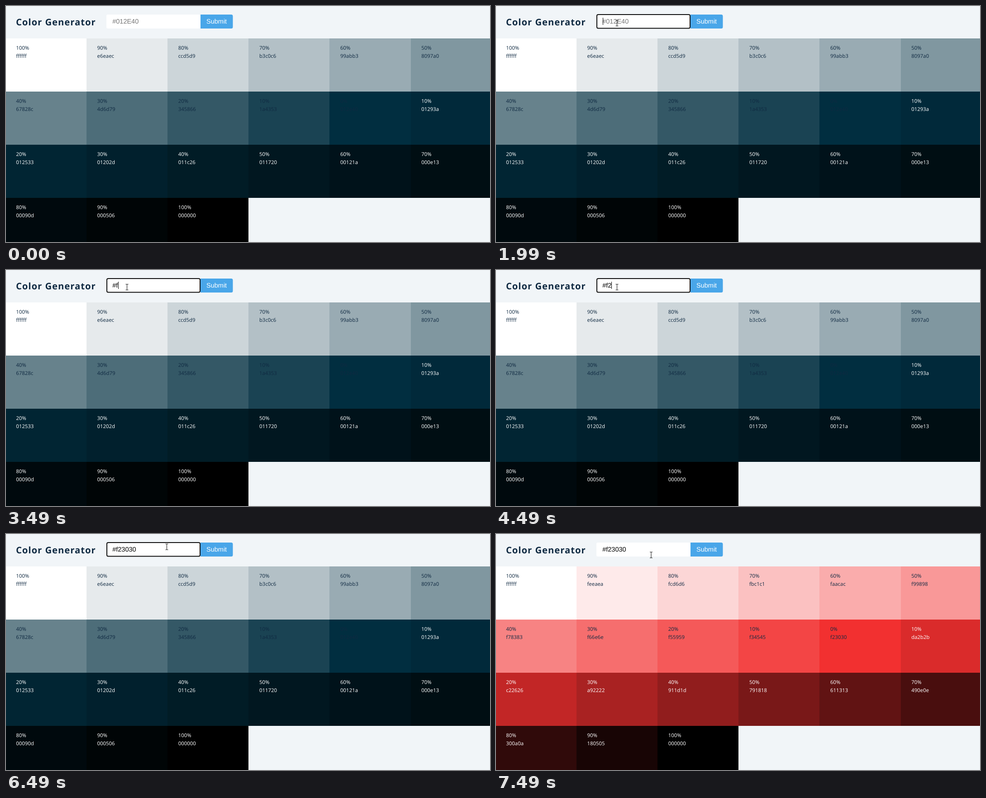
Write an HTML page that moves like this. It is 1070 by 524 pixels and loops after 7990 ms.

```html
<!DOCTYPE html>
<html lang="en">
<head>
<meta charset="utf-8">
<title>Color Generator</title>
<style>
  html, body { margin: 0; width: 100%; height: 100%; overflow: hidden; background: #f1f5f8; }
  svg { display: block; width: 1070px; height: 524px; text-rendering: geometricPrecision; }
  .title { font: 700 20.2px "Open Sans", "Noto Sans", sans-serif; letter-spacing: 1px; fill: #102a42; }
  .field { font: 14.5px "Liberation Sans", Arial, sans-serif; }
  .cell { font: 11.4px "Open Sans", "Noto Sans", sans-serif; fill: #102a42; }
  .cell.light { font-weight: 500; fill: #fff; }
</style>
</head>
<body>
<svg viewBox="0 0 1070 524">
  <rect width="1070" height="524" fill="#f1f5f8"/>
  <g id="palette"></g>

  <text class="title" x="22" y="42.5">Color Generator</text>
  <path d="M430 19h68a3.5 3.5 0 0 1 3.5 3.5v24a3.5 3.5 0 0 1-3.5 3.5h-68z" fill="#49a6e9"/>
  <text class="field" x="443" y="39" fill="#fff">Submit</text>
  <path d="M225 19h205v31h-205a3 3 0 0 1-3-3v-25a3 3 0 0 1 3-3z" fill="#fff"/>
  <rect id="focus" x="223" y="19" width="206" height="30.5" rx="3" fill="#fff" stroke="#101010" stroke-width="2"/>
  <text id="value" class="field" x="235.2" y="39"></text>
  <rect id="caret" y="26" width="1" height="16"/>

  <g id="arrow">
    <path d="M.5 .5v14.2l3.3-3.1 2.2 5 2.2-1-2.1-4.8h4.5z" fill="#fff" stroke="#000" stroke-width=".9"/>
  </g>
  <g id="beam" fill="none">
    <path d="M-3-6.5h2l1 .8 1-.8h2M0-5.7v11.4M-3 6.5h2l1-.8 1 .8h2" stroke="#222" stroke-width="1.1"/>
  </g>
  <g id="hand">
    <circle r="11" fill="#ffeb14" fill-opacity=".55"/>
    <path transform="translate(-1 1)" d="M.3 9.8V1.6C.3-.1 2.6-.1 2.6 1.6V6.2C3.2 5.3 4.8 5.5 4.9 6.6C5.6 5.9 7 6.2 7.1 7.2C7.8 6.6 9.2 7 9.2 8.4V12.2C9.2 13.5 8.2 14.2 8.2 16H1.5C1.3 14.3-.6 13-2.3 10.5C-3.2 9-1.5 7.9-.6 8.9Z"
      fill="#fff" stroke="#000" stroke-width=".9" stroke-linejoin="round"/>
    <path d="M1.6 7.2v3M3.9 7.6v2.6M6.1 8.2v2" stroke="#000" stroke-width=".7"/>
  </g>
</svg>
<script>
const LOOP = 7990;
const PLACEHOLDER = '#012E40';
const $ = id => document.getElementById(id);
const [palette, focusRing, value, caret] = ['palette', 'focus', 'value', 'caret'].map($);
const pointers = ['arrow', 'beam', 'hand'];

// Each step holds until the next one and inherits what it does not set.
const steps = [
  { at: 0, text: '', focus: false, caretX: 0, pointer: '', x: 0, y: 0, base: '012e40' },
  { at: 500, pointer: 'arrow', x: 298, y: 68 },
  { at: 990, pointer: 'beam', x: 266, y: 38, focus: true, caretX: 236 },
  { at: 1500, x: 267.5, caretX: 0 },
  { at: 1990, caretX: 236 },
  { at: 2490, text: '#', caretX: 243 },
  { at: 2990, caretX: 0 },
  { at: 3490, text: '#f', caretX: 248 },
  { at: 4490, text: '#f2', caretX: 255 },
  { at: 4990, text: '#f23', caretX: 263 },
  { at: 5490, text: '#f230', caretX: 271 },
  { at: 5990, text: '#f23030', caretX: 287 },
  { at: 6490, caretX: 0, x: 355.5, y: 28.5 },
  { at: 6990, focus: false, pointer: 'hand', x: 470, y: 44 },
  { at: 7490, pointer: 'beam', x: 343, y: 46.5, base: 'f23030' }
];
steps.forEach((step, i) => { steps[i] = { ...steps[i - 1], ...step }; });

// Mix each channel towards white (255) or black (0).
function mix(base, percent, end) {
  return base.match(/../g).map(pair => {
    const level = Math.round((parseInt(pair, 16) * (100 - percent) + end * percent) / 100);
    return level.toString(16).padStart(2, '0');
  }).join('');
}

const columnX = c => c ? Math.round(179.1 * c - 1) : 0;

function drawPalette(base) {
  let markup = '';
  for (let i = 0; i < 21; i++) {
    const shade = i > 10;
    const percent = Math.abs(10 - i) * 10;
    const hex = mix(base, percent, shade ? 0 : 255);
    const col = i % 6;
    const x = columnX(col);
    const y = 72 + 118 * Math.floor(i / 6);
    const textX = 22.3 + 179.2 * col;
    const style = shade ? 'cell light' : 'cell';
    markup += `<rect x="${x}" y="${y}" width="${columnX(col + 1) - x}" height="118" fill="#${hex}"/>
      <text class="${style}" x="${textX}" y="${y + 25.2}">${percent}%</text>
      <text class="${style}" x="${textX}" y="${y + 43.3}">${hex}</text>`;
  }
  palette.innerHTML = markup;
}

const show = (el, on) => el.setAttribute('visibility', on ? 'visible' : 'hidden');
let current = {};

function render(step) {
  if (step === current) return;
  if (step.base !== current.base) drawPalette(step.base);
  value.textContent = step.text || PLACEHOLDER;
  value.setAttribute('fill', step.text ? '#000' : '#757575');
  show(focusRing, step.focus);
  show(caret, step.caretX > 0);
  caret.setAttribute('x', step.caretX);
  for (const name of pointers) {
    const el = $(name);
    show(el, name === step.pointer);
    el.setAttribute('transform', `translate(${step.x} ${step.y})`);
  }
  current = step;
}

function tick() {
  const time = performance.now() % LOOP;
  render(steps.findLast(step => step.at <= time));
  requestAnimationFrame(tick);
}
tick();
</script>
</body>
</html>
```
